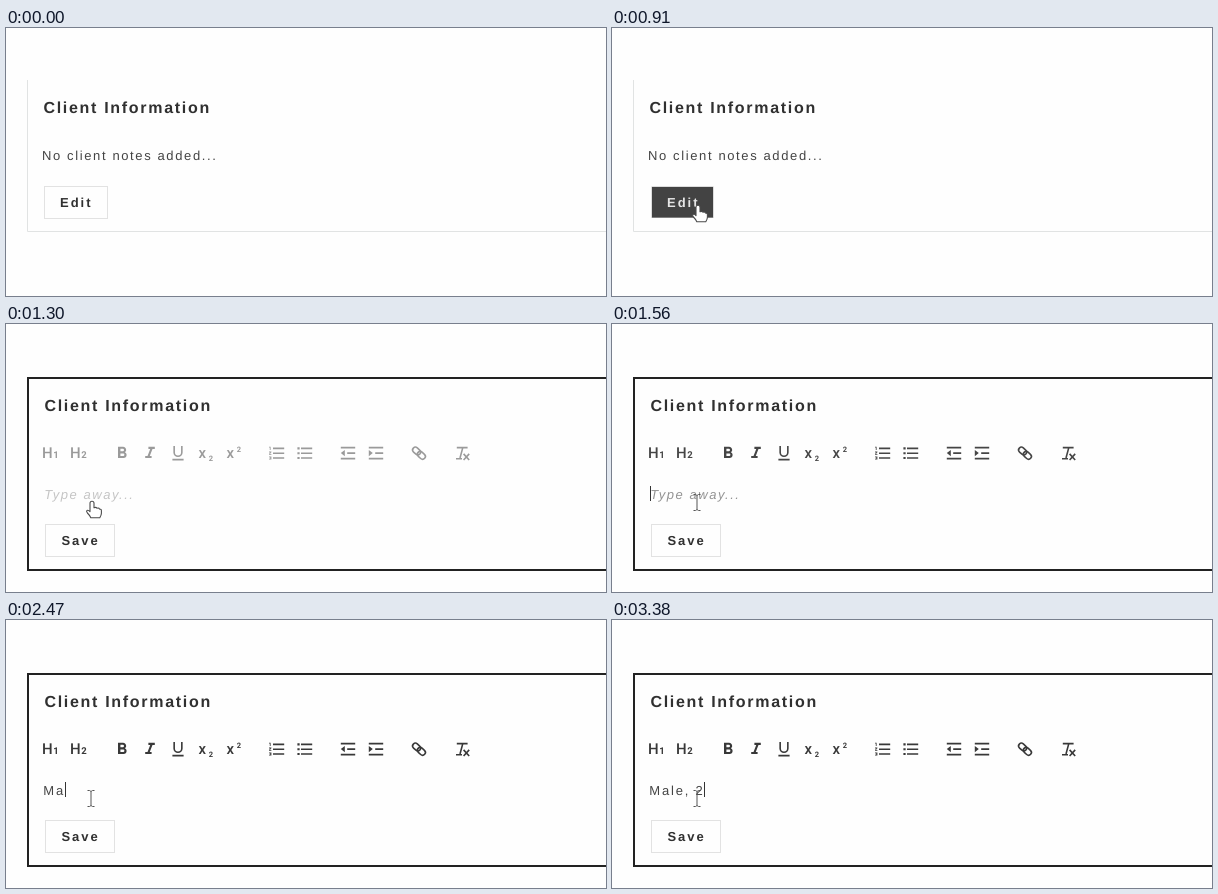
Write an HTML page that moves like this. It is 600x268 px and loops after 3.64 s.

```html
<!DOCTYPE html>
<html lang="en">
<head>
<meta charset="utf-8">
<title>Client notes editor</title>
<style>
  html, body { margin: 0; width: 100%; height: 100%; overflow: hidden; background: #fefefe; }
  svg { display: block; width: 600px; height: 268px; }
  text {
    font: 13px "Liberation Sans", Arial, sans-serif; letter-spacing: 1.62px;
    fill: #444; white-space: pre; text-rendering: geometricPrecision;
  }
  .title { font-size: 16px; font-weight: bold; letter-spacing: 1.7px; fill: #303030; }
  .label { font-weight: bold; letter-spacing: 1.98px; fill: #303030; }
  .hint { font-style: italic; letter-spacing: 1.53px; fill: #8c8c8c; }
  .typed { letter-spacing: 1.8px; }
  .button { fill: #fefefe; stroke: #e2e2e2; }
  #tools { fill: #383838; }
  #tools text { font: 500 15px Roboto, "Liberation Sans", sans-serif; letter-spacing: 0; fill: inherit; }
  #tools .small { font-size: 9.5px; font-weight: 700; }
  #tools .tiny { font-size: 7.5px; font-weight: 700; }
  .line { fill: none; stroke: #383838; stroke-width: 2; }
  .pointer { fill: #fff; stroke: #4a4a4a; stroke-width: 1.1; stroke-linejoin: round; }
</style>
</head>
<body>
<svg viewBox="0 0 600 268">
  <g id="view">
    <path d="M21.5 52V203.5H600" fill="none" stroke="#e1e3e3"/>
    <text class="title" x="37.4" y="85">Client Information</text>
    <text x="36" y="132">No client notes added...</text>
    <rect id="edit" class="button" x="38.5" y="158.5" width="63" height="32"/>
    <rect id="pressed" x="40" y="159" width="61" height="30.5" fill="#434343" stroke="#434343" stroke-opacity=".35"/>
    <text id="editLabel" class="label" x="54" y="179">Edit</text>
  </g>
  <g id="editor">
    <rect x="22" y="54" width="600" height="192" fill="none" stroke="#222" stroke-width="2"/>
    <text class="title" x="38.4" y="87">Client Information</text>
    <g id="tools"></g>
    <text id="hint" class="hint" x="38.3" y="174.5">Type away...</text>
    <text id="typed" class="typed" x="37.3" y="174.5"></text>
    <path id="caret" d="M0 162V177" stroke="#333"/>
    <rect class="button" x="39.5" y="200.5" width="69" height="32"/>
    <text class="label" x="55.4" y="221">Save</text>
  </g>
  <path id="hand" class="pointer" d="M-2 1.5Q-2-.5 0-.5T2 1.5V6Q4 5 5 6.4Q7 5.8 7.6 7.3Q9.4 7.2 9.4 9V11.5Q9.4 13.4 7.8 15.9H-1.2Q-2 13.8-4.6 11.2Q-6 9.6-5 8.6Q-3.8 7.9-2 9.8Z"/>
  <path id="beam" d="M-3.5-8H-1.5L0-7L1.5-8H3.5M-3.5 8H-1.5L0 7L1.5 8H3.5M0-7V7" fill="none" stroke="#555" transform="translate(85 178.5)"/>
</svg>
<script>
const $ = id => document.getElementById(id);
const STEP = 130, LOOP = 3640;

// Toolbar icons: centre x and a drawing on a 24-unit grid
const bars = "M7 5H21V7H7ZM7 11H21V13H7ZM7 17H21V19H7Z";
const dent = arrow => `<path d="M3 4H21V6.2H3ZM11 10.7H21V13H11ZM3 17.6H21V19.8H3Z${arrow}"/>`;
const icons = [
  [116, '<path d="M15.6 10.8c1-.7 1.65-1.8 1.65-2.8 0-2.3-1.75-4-4-4H7v14h7c2.1 0 3.75-1.7 3.75-3.8 0-1.5-.9-2.8-2.15-3.4zM10 6.5h3a1.5 1.5 0 0 1 0 3h-3zm3.5 9H10v-3h3.5a1.5 1.5 0 0 1 0 3z"/>'],
  [144, '<path d="M10 4V6.6H12.3L8.9 15.4H6V18H14V15.4H11.7L15.1 6.6H18V4Z"/>'],
  [172, '<path class="line" d="M7.2 3V11A4.8 4.8 0 0 0 16.8 11V3M5 20H19"/>'],
  [271, `<path d="${bars}M2 4H4V8H3V5H2ZM2 10H5V10.9L3.2 13H5V14H2V13.1L3.8 11H2ZM2 16H5V20H2V19H4V18.5H3V17.5H4V17H2Z"/>`],
  [299, `<path d="${bars}M2.5 4.7H5.3V7.3H2.5ZM2.5 10.7H5.3V13.3H2.5ZM2.5 16.7H5.3V19.3H2.5Z"/>`],
  [342, dent("M8 8V15.7L3 11.8Z")],
  [370, dent("M3 8V15.7L8 11.8Z")],
  [413, '<g class="line" transform="rotate(42 12 12)"><rect x="2.5" y="8.5" width="11" height="7" rx="3.5"/><rect x="10.5" y="8.5" width="11" height="7" rx="3.5"/></g>'],
  [456, '<path class="line" d="M5.5 5H19M13 5L9.5 18M4.5 19H12M14 12.8L21 20.4M21 12.8L14 20.4"/>']
];
const glyph = (x, y, s, kind = "") => `<text class="${kind}" x="${x}" y="${y}">${s}</text>`;
$("tools").innerHTML =
  [1, 2].map(n => glyph(8 + 28 * n, 134.3, "H") + glyph(19.3 + 28 * n, 134.3, n, "small")).join("") +
  [[192.6, 137], [220.6, 128]].map(([x, y]) => glyph(x, 134, "x") + glyph(x + 10.2, y, 2, "tiny")).join("") +
  icons.map(([x, art]) => `<g transform="translate(${x - 9.6} 119.6) scale(.8)">${art}</g>`).join("");

const strokes = [2210, 2470, 2600, 2730, 3120, 3250, 3380];
const show = (id, on) => $(id).style.display = on ? "" : "none";
const clamp = v => Math.max(0, Math.min(1, v));
const mix = (a, b, k) => a + (b - a) * k;

function handAt(t) {
  if (t > 650) return [86, 177.8];
  const k = 1 - (1 - clamp((t - 130) / 520)) ** 2;
  return [mix(128, 93, k), mix(240, 184, k)];
}

function draw(now) {
  const t = Math.floor(now % LOOP / STEP) * STEP;
  const editing = t >= 1040, pressed = t >= 910 && !editing;
  const [x, y] = handAt(t);
  show("view", !editing);
  show("editor", editing);
  show("pressed", pressed);
  show("edit", !pressed);
  $("edit").style.fill = t > 130 && y < 190 ? "#f9f9f9" : "";
  $("editLabel").style.fill = pressed ? "#e6e6e6" : "";
  $("editLabel").setAttribute("x", pressed ? 55 : 54);

  show("hand", t >= 130 && t < 1430);
  show("beam", t >= 1430);
  $("hand").setAttribute("transform", `translate(${x} ${y})`);

  const fade = clamp((t - 1000) / 600);
  $("tools").style.opacity = $("hint").style.opacity = fade;
  const count = strokes.filter(s => t >= s).length;
  $("typed").textContent = "Male, 2".slice(0, count);
  show("hint", !count);
  show("caret", t >= 1430 && t !== 2080);
  const end = count ? 37.6 + $("typed").getComputedTextLength() : 38.5;
  $("caret").setAttribute("transform", `translate(${Math.floor(end) + .5} 0)`);
}

const start = performance.now();
(function tick() {
  draw(performance.now() - start);
  requestAnimationFrame(tick);
})();
</script>
</body>
</html>
```
